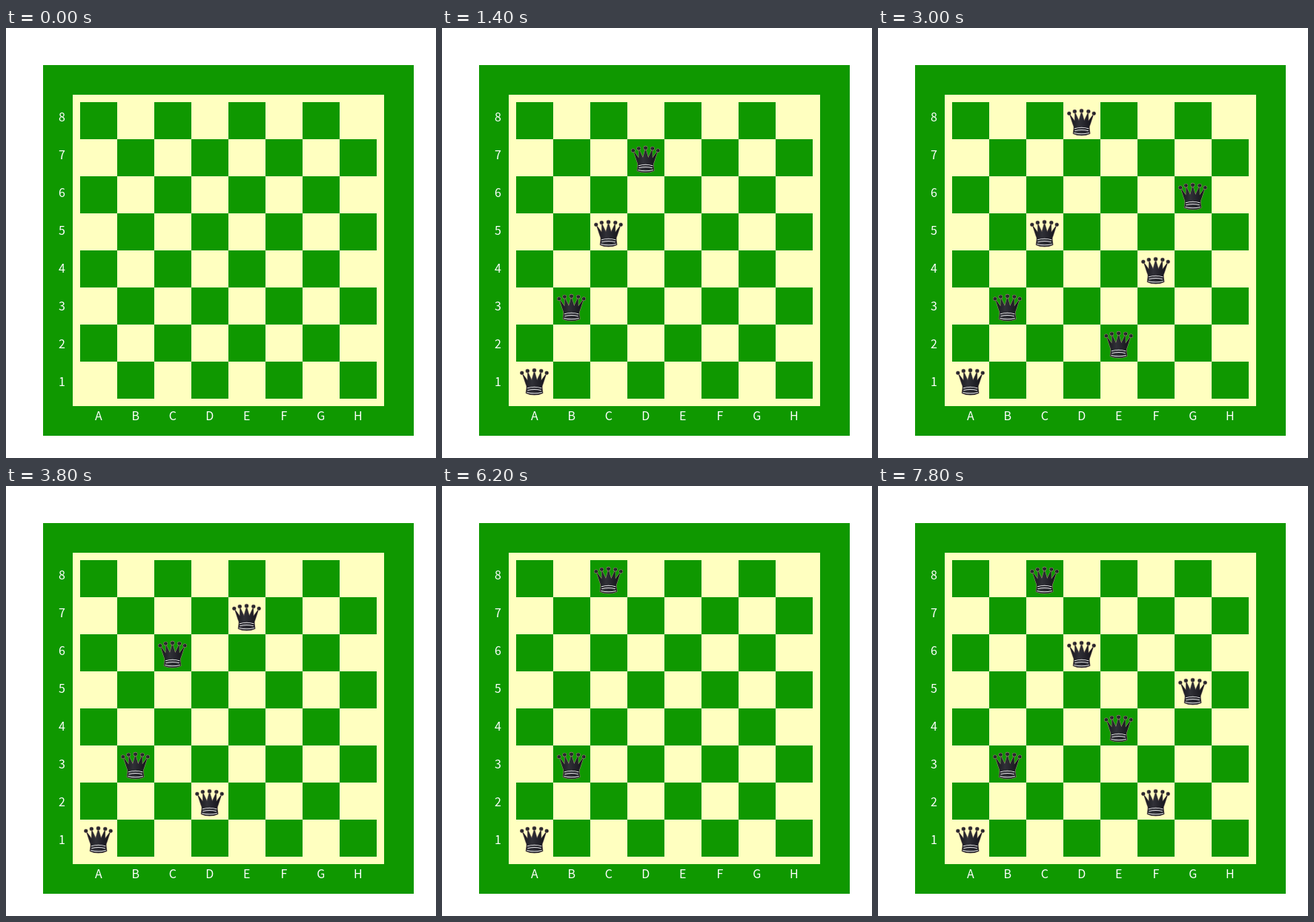
An HTML page that plays this animation: 580x580 px, repeating every 8 s.

```html
<!DOCTYPE html>
<html lang="en">
<head>
<meta charset="utf-8">
<title>Eight queens backtracking</title>
<style>
  html, body { margin: 0; width: 100%; height: 100%; overflow: hidden; background: #fff; }
  svg { display: block; width: 100%; height: 100%; }
  text {
    font: 16px "Noto Sans CJK SC", "Noto Sans CJK JP", "Noto Sans CJK", "Noto Sans", sans-serif;
    fill: #fff;
    text-anchor: middle;
  }
</style>
</head>
<body>
<svg viewBox="0 0 580 580">
  <defs>
    <linearGradient id="ink" x1="0" x2="1" y1="0" y2="0">
      <stop offset="0" stop-color="#17161c"/>
      <stop offset=".4" stop-color="#303037"/>
      <stop offset="1" stop-color="#121118"/>
    </linearGradient>
    <g id="queen">
      <g fill="url(#ink)" stroke="#9a8574" stroke-width="1.1" stroke-linejoin="round" paint-order="stroke">
        <path d="M8.4 16 L15.4 25.5 L15.6 13.5 L21 25 L24.5 12.5 L28.2 25 L33.6 13.5 L33.8 25.5 L40.8 16
                 L36.4 29.5 Q34.4 33.5 35.2 36 L36 42.4 Q31 45 24.6 45 Q18 45 13.2 42.4 L14 36 Q14.8 33.5 12.8 29.5 Z"/>
        <circle cx="7.8" cy="15.3" r="2.2"/>
        <circle cx="15.3" cy="12.5" r="2.3"/>
        <circle cx="24.5" cy="11.8" r="2.4"/>
        <circle cx="33.8" cy="12.5" r="2.3"/>
        <circle cx="41.2" cy="15.3" r="2.2"/>
      </g>
      <g fill="none" stroke="#e6e6e8" stroke-width="1.1" stroke-linecap="round">
        <path d="M15.2 35.7 Q24.6 32.7 34 35.7"/>
        <path d="M15.6 38.7 Q24.6 36.3 33.6 38.7"/>
        <path d="M14.8 41.5 Q24.6 43.9 34.4 41.5"/>
      </g>
    </g>
  </defs>
  <g id="board"></g>
  <g id="pieces"></g>
</svg>
<script>
const N = 8, CELL = 50, LEFT = 100, TOP = 100;
const STEP = 200, COUNT = 40;
const GREEN = '#0f9800', CREAM = '#ffffc0';
const board = document.getElementById('board');
const pieces = document.getElementById('pieces');

function add(parent, tag, attrs, text) {
  const el = document.createElementNS('http://www.w3.org/2000/svg', tag);
  for (const key in attrs) el.setAttribute(key, attrs[key]);
  if (text) el.textContent = text;
  parent.appendChild(el);
  return el;
}

function square(x, y, size, fill) {
  add(board, 'rect', { x, y, width: size, height: size, fill });
}

function drawBoard() {
  square(50, 50, 500, GREEN);
  square(90, 90, 420, CREAM);
  for (let r = 0; r < N; r++) {
    for (let c = r % 2; c < N; c += 2) square(LEFT + c * CELL, TOP + r * CELL, CELL, GREEN);
  }
  for (let i = 0; i < N; i++) {
    add(board, 'text', { x: 75.4, y: 126 + 51 * i }, String(N - i));
    add(board, 'text', { x: 124.8 + CELL * i, y: 529 }, 'ABCDEFGH'[i]);
  }
}

// Depth-first search, column by column; every placement is one state.
function search(queens, states) {
  const col = queens.length;
  for (let row = 0; row < N && states.length < COUNT; row++) {
    const safe = queens.every((r, c) => r !== row && Math.abs(r - row) !== col - c);
    if (!safe) continue;
    const next = [...queens, row];
    states.push(next);
    search(next, states);
  }
  return states;
}

drawBoard();
const states = search([], [[]]);
const queens = Array.from({ length: N }, () => add(pieces, 'use', { href: '#queen' }));

function render(time) {
  const state = states[Math.floor(time / STEP) % COUNT];
  queens.forEach((queen, col) => {
    const shown = col < state.length;
    queen.setAttribute('visibility', shown ? 'visible' : 'hidden');
    if (!shown) return;
    queen.setAttribute('x', LEFT + col * CELL);
    queen.setAttribute('y', TOP + (N - 1 - state[col]) * CELL);
  });
}

const start = performance.now();
function tick() {
  render(performance.now() - start);
  requestAnimationFrame(tick);
}
tick();
</script>
</body>
</html>
```
